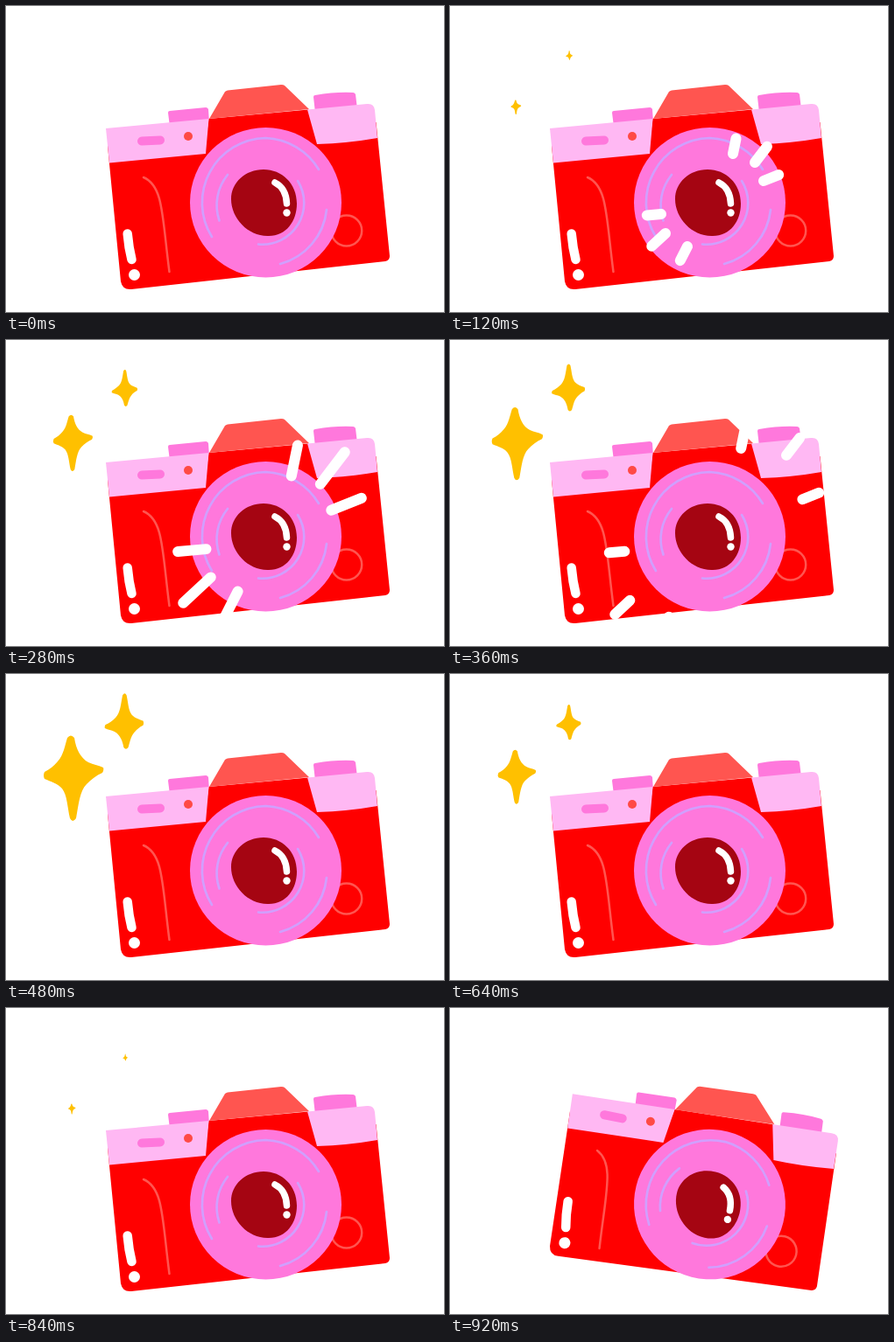
Animation of 500x350 px, one loop 1.68 s. Source, as an HTML page:

```html
<!DOCTYPE html>
<html lang="en">
<head>
<meta charset="utf-8">
<title>Camera flash</title>
<style>
  html, body { margin: 0; width: 100%; height: 100%; overflow: hidden; background: #fff; }
  svg { display: block; width: 100vw; height: 100vh; }
  .line { fill: none; stroke-linecap: round; stroke-linejoin: round; }
  .coral { stroke: #ff5550; stroke-width: 2.5; }
  .lilac { stroke: #d0a0ff; stroke-width: 2.6; }
  .white { stroke: #fff; }
</style>
</head>
<body>
<svg viewBox="0 0 500 350">
  <defs>
    <path id="star" fill="#ffc000" d="M-5 -42 Q-1 -47 3 -42 C5 -29 10 -19 19 -14 C25 -11 30 -11 36 -8 Q37 -5 35 -2
      C28 1 22 6 17 11 C9 19 8 34 5 50 Q1 56 -2 50 C-5 37 -5 24 -11 16 C-16 10 -24 8 -31 5 Q-33 1 -31 -3
      C-25 -6 -20 -10 -16 -15 C-9 -23 -8 -33 -5 -42Z"/>
  </defs>
  <g id="camera">
    <path fill="#ff78dc" d="M185 122 Q185 120 187 120 L228 116 Q230 116 231 118 L232 134 L187 138Z
      M351 104 Q351 102 353 102 Q376 98 396 99 Q398 99 399 101 L401 118 L353 122Z"/>
    <path fill="#f00" d="M116 160 L228.500 150 L231.500 129 L345 118.500 L352 140 L422.500 133
      L438 286 Q438 291 433 292 L143 324 Q133 325 131 315Z"/>
    <path fill="#ffb8f3" d="M114 140 L231.500 129 L228 169 Q170 174.500 118 179.500Z
      M344 118.500 L412 112 Q420 111 421 119 L424 151 Q390 157 355 158Z"/>
    <path fill="#ff5550" d="M250 98 Q251 97 253 96.500 L314 90 Q317 90 318 91 L346 118 L232 129Z"/>
    <path class="line" stroke="#ff78dc" stroke-width="10" d="M155 154.500 L176 153.500"/>
    <circle cx="208" cy="149" r="5" fill="#ff4a45"/>
    <path class="line coral" d="M157 196 C180 206 178 240 186.500 304"/>
    <circle class="line coral" cx="388.700" cy="257" r="17.500"/>
    <path class="line white" stroke-width="10.500" d="M138.700 260.500 Q140 276 143.500 290"/>
    <circle cx="146.500" cy="307.500" r="6.500" fill="#fff"/>
    <ellipse cx="296.500" cy="224.700" rx="86.500" ry="85.700" fill="#ff78dc"/>
    <path class="line lilac" d="M235 264 A74 74 0 0 1 296.500 151 A74 74 0 0 1 357 187 M366 233 A72 72 0 0 1 313 295
      M243.500 245.500 A55 55 0 0 1 253 193 M333 200 A47.500 47.500 0 0 1 288 272.500"/>
    <path fill="#a50512" d="M294 187 C315 187 332 203 332 226 C332 246 320 263 300 263
      C277 264 257 243 257 221 C257 202 273 187 294 187Z"/>
    <path class="line white" stroke-width="7.500" d="M307 202 C315 206 320 214 320.500 226"/>
    <circle cx="320.500" cy="236.500" r="4.200" fill="#fff"/>
  </g>
  <path id="rays" class="line white" stroke-width="12"/>
  <use id="big" href="#star"/>
  <use id="small" href="#star"/>
</svg>
<script>
  const LOOP = 1680, STEP = 40, TURN = 920;
  const $ = id => document.getElementById(id);
  const clamp = x => Math.max(0, Math.min(1, x));

  // Start and end of each flash ray
  const rays = [
    [323, 169, 336.5, 103], [348, 179, 400.7, 110], [358, 200, 423, 174],
    [241, 238, 180, 243.5], [246, 260, 186.5, 315.4], [271, 275, 240, 336]
  ];
  // Star size over time
  const sizes = [[60, 0], [120, .17], [280, .66], [400, .95], [480, 1], [560, .84], [880, .02], [900, 0]];

  function starSize(t) {
    const i = sizes.findIndex(k => t < k[0]);
    if (i < 1) return 0;
    const [t0, a] = sizes[i - 1], [t1, b] = sizes[i];
    return a + (b - a) * (t - t0) / (t1 - t0);
  }

  function rayPath(t) {
    const head = clamp((t - 30) / 340);
    const u = clamp((t - 210) / 240), tail = u * u * (3 - 2 * u);
    if (head <= tail) return "";
    return rays.map(([x, y, x2, y2]) => {
      const at = p => `${x + (x2 - x) * p} ${y + (y2 - y) * p}`;
      return `M${at(tail)} L${at(head)}`;
    }).join("");
  }

  function draw(now) {
    const t = Math.floor(now % LOOP / STEP) * STEP;
    const s = starSize(t);
    $("camera").setAttribute("transform", `rotate(${t >= TURN ? 14 : 0} 296.8 224.5)`);
    $("rays").setAttribute("d", rayPath(t));
    $("big").setAttribute("transform", `translate(75 115) scale(${s})`);
    $("small").setAttribute("transform", `translate(136.3 56.8) rotate(180) scale(${s * .65})`);
  }

  const start = performance.now();
  function tick() {
    draw(performance.now() - start);
    requestAnimationFrame(tick);
  }
  tick();
</script>
</body>
</html>
```
